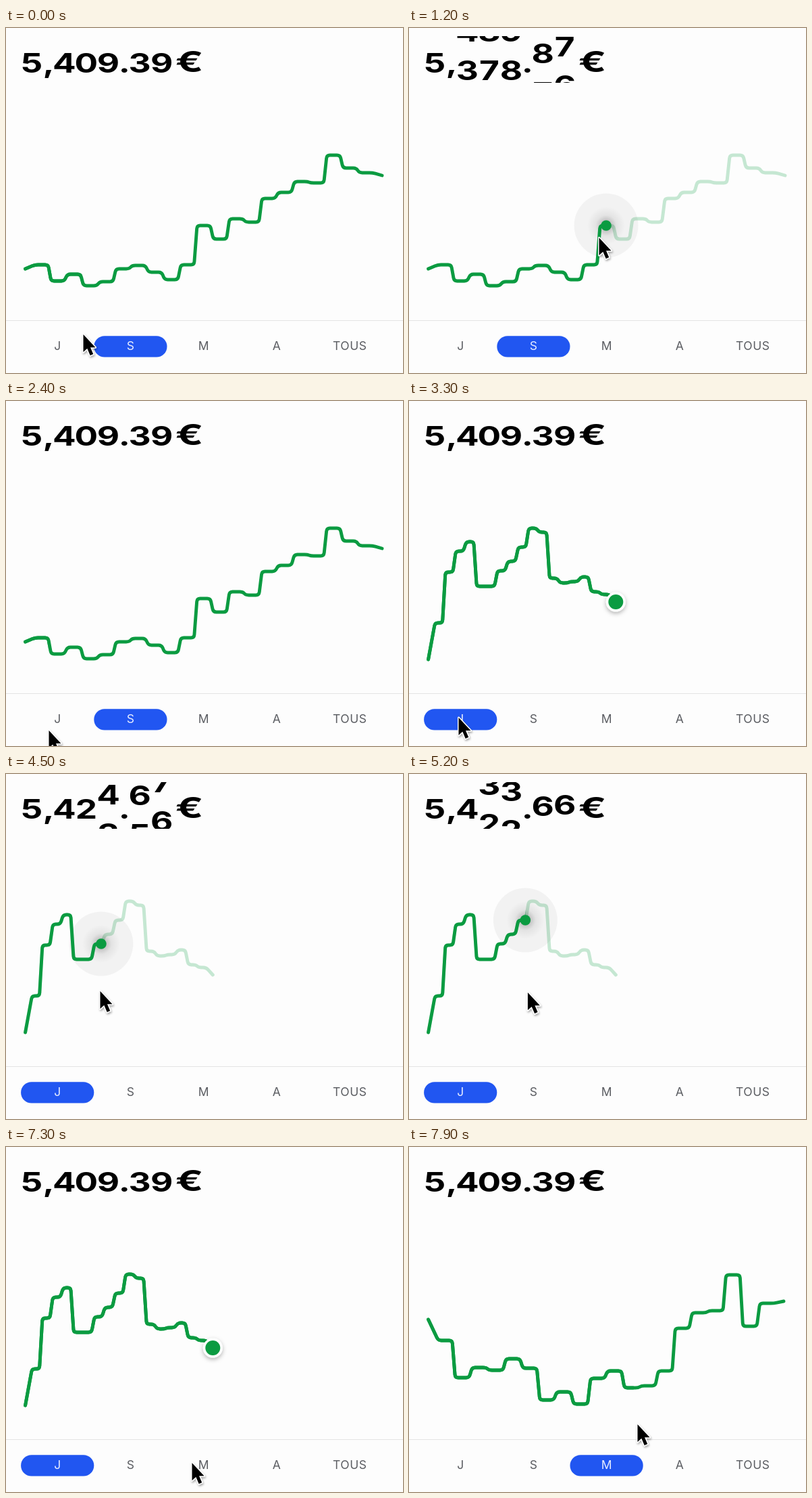
An HTML page that plays this animation: 588x510 px, repeating every 8000 ms.

```html
<!DOCTYPE html>
<html lang="fr">
<head>
<meta charset="utf-8">
<title>Solde</title>
<style>
  html, body { margin: 0; width: 100%; height: 100%; overflow: hidden; background: #fdfdfd; }
  svg { display: block; width: 588px; height: 510px; }
  text { font-family: Inter, "Liberation Sans", sans-serif; text-anchor: middle; }
  #amount text { font-weight: 700; font-size: 39.5px; fill: #000; }
  #tabs text { font-size: 17.5px; letter-spacing: .5px; }
  .line { fill: none; stroke: #0b9b41; stroke-width: 4.9; stroke-linecap: round; stroke-linejoin: round; }
</style>
</head>
<body>
<svg viewBox="0 0 588 510">
  <defs>
    <clipPath id="window"><rect y="12" width="588" height="69"/></clipPath>
    <clipPath id="past"><rect id="pastBox" height="430"/></clipPath>
    <radialGradient id="glow">
      <stop offset=".2" stop-color="#000" stop-opacity=".22"/>
      <stop offset=".55" stop-color="#000" stop-opacity=".06"/>
      <stop offset="1" stop-color="#000" stop-opacity="0"/>
    </radialGradient>
    <filter id="soft" x="-60%" y="-60%" width="220%" height="220%">
      <feDropShadow dx="0" dy="2.5" stdDeviation="3" flood-opacity=".3"/>
    </filter>
    <filter id="lift" x="-40%" y="-40%" width="190%" height="190%">
      <feDropShadow dx="1" dy="2" stdDeviation="1.6" flood-opacity=".35"/>
    </filter>
  </defs>
  <rect width="588" height="510" fill="#fdfdfd"/>
  <g clip-path="url(#window)"><g id="amount"></g></g>
  <path id="future" class="line"/>
  <g id="halo">
    <circle r="47.5" fill="#000" fill-opacity=".043"/>
    <circle r="28" fill="url(#glow)"/>
  </g>
  <path id="solid" class="line" clip-path="url(#past)"/>
  <g id="dot">
    <circle id="ring" fill="#fff" filter="url(#soft)"/>
    <circle id="core" fill="#0b9b41"/>
  </g>
  <path d="M0 432.5H588" stroke="#e3e3e4"/>
  <g id="tabs"><rect id="pill" y="455.2" width="108.2" height="31.4" rx="15.7" fill="#2156f1"/></g>
  <path id="cursor" d="M1.5 2V28L7.3 22.8 11.7 33 16.2 31 12 21.2H19.5Z" fill="#000"
        stroke="#fff" stroke-width="3" paint-order="stroke" stroke-linejoin="round" filter="url(#lift)"/>
</svg>
<script>
const LOOP = 8000, STEP = 100, LAG = 40;
const PITCH = 57, BASE = 65.6, LEFT = 28.6, TAB = 108.2;
const $ = id => document.getElementById(id);
const mix = (a, b, p) => a + (b - a) * p;
const clamp = (v, lo, hi) => Math.max(lo, Math.min(hi, v));

// Eases from 0 to 1 during the given span.
function ramp(t, from, length) {
  const p = clamp((t - from) / length, 0, 1);
  return p * p * (3 - 2 * p);
}

function set(el, attrs) {
  for (const name in attrs) el.setAttribute(name, attrs[name]);
}
function addText(parent, label, attrs = {}) {
  const el = document.createElementNS('http://www.w3.org/2000/svg', 'text');
  set(el, attrs);
  el.textContent = label;
  return parent.appendChild(el);
}

// Finds the rows around a position and how far between them it lies.
function between(rows, at) {
  const last = rows.length - 1;
  const next = rows.findIndex(row => row[0] > at);
  if (next < 0) return [rows[last], rows[last], 0];
  const a = rows[Math.max(next - 1, 0)], b = rows[next];
  return [a, b, a === b ? 0 : (at - a[0]) / (b[0] - a[0])];
}
function track(rows, at) {
  const [a, b, p] = between(rows, at);
  return a.slice(1).map((v, i) => mix(v, b[i + 1], p));
}

// Each value is a short plateau joined to the next by a steep slope.
function makeChart(right, ...values) {
  const last = values.length - 1, gap = (right - LEFT) / last, half = gap / 2 - 2.2;
  const points = values.flatMap((y, k) => {
    const x = LEFT + k * gap;
    return k % last ? [[x - half, y], [x + half, y]] : [[x, y]];
  });
  return { right, points, path: roundedPath(points, 4.5) };
}
function toward(from, to, r) {
  const d = Math.hypot(to[0] - from[0], to[1] - from[1]);
  const p = Math.min(r, d / 2) / d;
  return [mix(from[0], to[0], p), mix(from[1], to[1], p)];
}
function roundedPath(pts, r) {
  let d = 'M' + pts[0];
  for (let i = 1; i < pts.length - 1; i++)
    d += `L${toward(pts[i], pts[i - 1], r)}Q${pts[i]} ${toward(pts[i], pts[i + 1], r)}`;
  return d + 'L' + pts[pts.length - 1];
}

const day = makeChart(306.3, 382, 328, 253, 222, 208, 274, 274, 251, 237, 216, 188, 194, 262, 269, 267, 260, 282, 286, 297);
const week = makeChart(557, 356, 350, 374, 364, 381, 375, 356, 351, 361, 372, 350, 292,
  312, 282, 287, 252, 243, 227, 229, 188, 207, 214, 218);
const month = makeChart(555, 255, 286, 341, 326, 330, 313, 327, 374, 362, 380, 342,
  331, 356, 353, 331, 268, 245, 242, 189, 265, 231, 228);

// time, x, y
const pointer = [
  [0, 113, 451], [50, 80, 394], [300, 80, 394], [800, 400, 322], [1200, 280, 308], [1900, 70, 395],
  [2400, 62, 485], [3300, 72, 466], [4200, 160, 330], [4500, 138, 319], [5500, 190, 322],
  [5900, 226, 331], [6600, 303, 347], [7300, 274, 465], [7900, 337, 408]
];

// time, position of each rolling digit
const REST = [4, 0, 9, 3, 9];
const poses = [
  [0, ...REST], [300, ...REST], [1200, 3.2, 7.2, 8.2, 7.76, 6.58], [2350, ...REST], [3900, ...REST],
  [4500, 4, 2, 3.63, 5.66, 6.32], [5900, 4, 2.8, 1.46, 6.2, 5.5], [6650, ...REST]
];

// On the way from pose to pose the lower digits swing further.
function digitsAt(t) {
  const [a, b, p] = between(poses, t);
  const moving = a.some((v, i) => i && v !== b[i]);
  const swing = moving ? Math.sin(2 * Math.PI * p) : 0;
  return REST.map((_, i) => (mix(a[i + 1], b[i + 1], p) + 0.4 * i * i * swing + 10) % 10);
}

const amount = $('amount');
// The amount is set in a wide face.
function place(el, x, y = BASE, wide = 1.3) {
  set(el, { transform: `translate(${x} ${y}) scale(${wide} 1)` });
}
place(addText(amount, '5'), 38.3);
place(addText(amount, ','), 63);
const reels = REST.map(() => [addText(amount, ''), addText(amount, '')]);
const point = addText(amount, '.'), euro = addText(amount, '€');
euro.style.fontSize = '42px';

const tabs = ['J', 'S', 'M', 'A', 'TOUS'].map((label, i) =>
  addText($('tabs'), label, { x: 76.4 + TAB * i, y: 476.2 }));

const digitWidth = d => d === 1 ? 25 : 32.6;

function drawAmount(t) {
  let x = 70;
  digitsAt(t).forEach((v, i) => {
    const low = Math.floor(v), part = v - low, pair = [low, (low + 1) % 10];
    const w = mix(...pair.map(digitWidth), part);
    pair.forEach((d, n) => {
      reels[i][n].textContent = d;
      place(reels[i][n], x + w / 2, BASE + (part - n) * PITCH);
    });
    x += w;
    if (i === 2) {
      place(point, x + 7.5);
      x += 14;
    }
  });
  place(euro, x + 24.5, 65, 1.45);
}

function drawChart(t) {
  const chart = t < 2900 ? week : t < 7700 ? day : month;
  const live = chart === day;
  const h = ramp(t, 0, 100) - ramp(t, 2000, 200) + ramp(t, 3900, 200) - ramp(t, 6700, 200);
  const followed = clamp(track(pointer, Math.max(t - LAG, 0))[0], LEFT, chart.right);
  const x = live ? mix(chart.right, followed, h) : followed;
  const at = `translate(${x} ${track(chart.points, x)[0]})`;

  set($('future'), { d: chart.path, opacity: mix(1, .23, h) });
  set($('solid'), { d: chart.path });
  set($('pastBox'), { width: x });
  set($('halo'), { transform: at, opacity: h });
  set($('dot'), { transform: at, opacity: live ? 1 : h });
  set($('core'), { r: live ? mix(11, 7.8, h) : 7.8 });
  set($('ring'), { r: mix(14.5, 7, h), opacity: live ? 1 - h : 0 });
}

function drawTabs(t) {
  const slot = 1 - ramp(t, 2700, 300) + 2 * ramp(t, 7500, 400);
  set($('pill'), { x: 22.1 + TAB * slot });
  tabs.forEach((tab, i) => set(tab, { fill: i === Math.round(slot) ? '#e6ecff' : '#5b5d62' }));
}

function draw(t) {
  drawAmount(t);
  drawChart(t);
  drawTabs(t);
  set($('cursor'), { transform: `translate(${track(pointer, t)})` });
}

const start = performance.now();
function tick() {
  const t = (performance.now() - start) % LOOP;
  draw(Math.floor(t / STEP) * STEP);
  requestAnimationFrame(tick);
}
tick();
</script>
</body>
</html>
```
